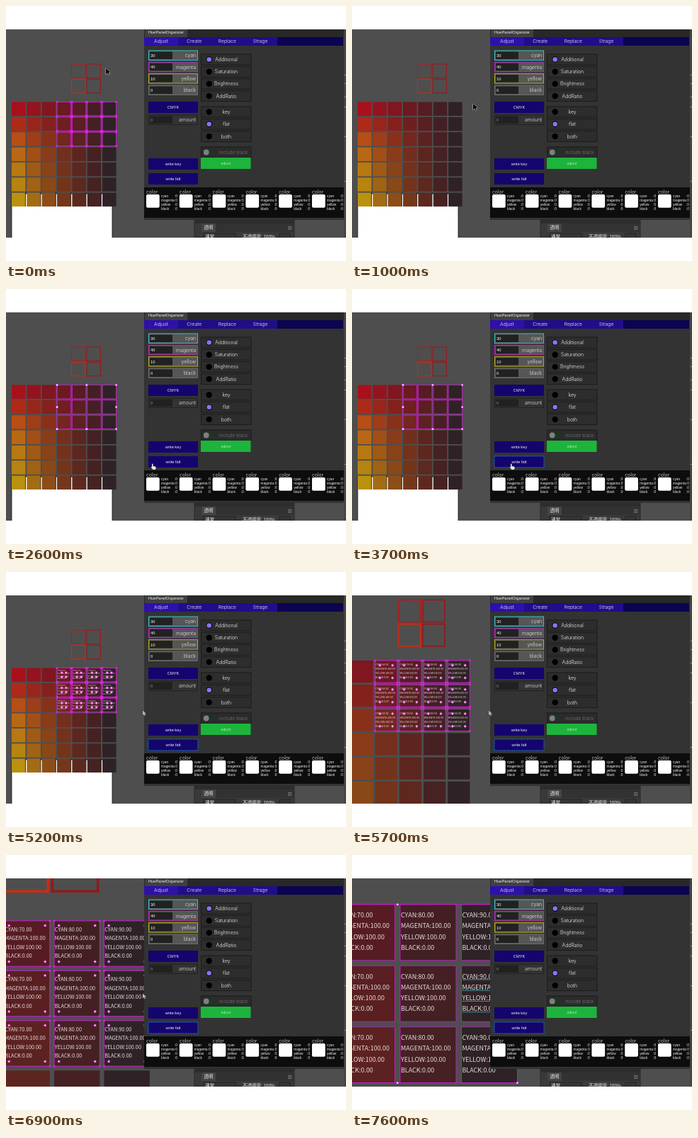
An HTML page with a canvas that plays this animation: 480 px wide and 360 px high, repeating every 8000 ms.

```html
<!DOCTYPE html>
<html lang="en">
<head>
<meta charset="utf-8">
<title>Colour panel</title>
<style>
html, body { margin: 0; width: 100%; height: 100%; overflow: hidden; background: #fff; }
canvas { display: block; width: 480px; height: 360px; }
</style>
</head>
<body>
<canvas id="stage"></canvas>
<script>
const LOOP = 8000, STEP = 100;
const SANS = '"Liberation Sans", Arial, sans-serif';
const LIGHT = 'Inter, "Liberation Sans", sans-serif';
const CJK = '"Noto Sans CJK JP", "Noto Sans CJK", sans-serif';
const MAGENTA = '#c01fc4';
const PITCH = 21.35, CELL = 19.5, ORIGIN = [8, 135.5], PIVOT = [114.75, 135.5];
const TEXT_TOP = 3.75, TEXT_PITCH = 3.77;
const canvas = document.getElementById('stage');
const ctx = canvas.getContext('2d');
const ratio = window.devicePixelRatio || 1;
canvas.width = 480 * ratio;
canvas.height = 360 * ratio;

// [time, x, y]
const cursorPath = [
  [0, 141, 88], [300, 146, 96], [900, 171, 138], [1300, 171, 138], [1900, 80, 188],
  [2050, 80, 188], [2500, 206, 246], [2700, 206, 246], [3100, 224, 246],
  [4400, 224, 246], [5000, 193, 195.5]
];
// [time, scale, x, y]
const cameraPath = [
  [5200, 1, 114.75, 135.5], [5500, 1.6, 101, 125], [5700, 1.6, 101, 125],
  [6300, 3.05, 68, 100.6], [6700, 3.05, 68, 100.6], [7500, 4.05, 68, 69.8]
];
const leftColumn = [
  [168, 16, 28], [174, 42, 24], [182, 78, 22], [184, 104, 20],
  [184, 120, 18], [182, 132, 16], [186, 146, 16]
];

function along(path, t) {
  const next = path.findIndex(k => k[0] > t);
  if (next === 0) return path[0].slice(1);
  if (next < 0) return path[path.length - 1].slice(1);
  const a = path[next - 1], b = path[next], u = (t - a[0]) / (b[0] - a[0]);
  return a.slice(1).map((v, i) => v + (b[i + 1] - v) * u);
}

function box(x, y, w, h, fill, stroke, line = 1) {
  if (fill) { ctx.fillStyle = fill; ctx.fillRect(x, y, w, h); }
  if (stroke) { ctx.strokeStyle = stroke; ctx.lineWidth = line; ctx.strokeRect(x, y, w, h); }
}

function dot(x, y, r, fill, stroke) {
  ctx.beginPath();
  ctx.arc(x, y, r, 0, 7);
  ctx.fillStyle = fill;
  ctx.fill();
  if (stroke) { ctx.strokeStyle = stroke; ctx.lineWidth = 1; ctx.stroke(); }
}

// y is the middle of the line
function label(text, x, y, size, align = 'center', color = '#eee', font = SANS) {
  ctx.font = `${font === LIGHT ? 300 : 400} ${size}px ${font}`;
  ctx.textAlign = align;
  ctx.fillStyle = color;
  ctx.fillText(text, x, y + size * 0.35);
}

function cellColor(col, row) {
  const u = col / 6, [r, g, b] = leftColumn[row];
  const mix = (from, to) => Math.round(from + (to - from) * u);
  const lift = (g - 16) * (1 - u) ** 2.1;
  return `rgb(${mix(r, 47)},${Math.round(mix(16, 34) + lift)},${mix(b, 38)})`;
}

function artwork(t) {
  const [scale, ox, oy] = along(cameraPath, t);
  const sx = x => ox + scale * (x - PIVOT[0]);
  const sy = y => oy + scale * (y - PIVOT[1]);
  const size = CELL * scale;
  const cellAt = (c, r) => [sx(ORIGIN[0] + c * PITCH), sy(ORIGIN[1] + r * PITCH)];

  box(sx(8), sy(265), 142 * scale, 200 * scale, '#fff', '#111', 0.8);

  ['#b01c1c', '#9a1a1e', '#c92c14', '#921a1c'].forEach((color, i) =>
    box(sx(92.6 + i % 2 * PITCH), sy(82 + (i >> 1) * PITCH), size, size, null, color, 1.1 * scale));

  for (let r = 0; r < 7; r++)
    for (let c = 0; c < 7; c++) {
      const [x, y] = cellAt(c, r);
      box(x, y, size, size, cellColor(c, r));
      if (r === 6 && c < 6) box(x + size - 0.3, y, 0.8, size, '#111');
    }

  if (t >= 1000 && t < 2000) return;
  const boxed = t >= 2000 && t < 4400 || t >= 7600;
  const written = t >= 4400;
  for (let r = 0; r < 3; r++)
    for (let c = 3; c < 7; c++) {
      const [x, y] = cellAt(c, r);
      if (written)
        [`CYAN:${c * 10 + 30}.00`, 'MAGENTA:100.00', 'YELLOW:100.00', 'BLACK:0.00'].forEach((line, i) =>
          label(line, x + 0.25 * scale, y + (TEXT_TOP + i * TEXT_PITCH) * scale, 2.2 * scale, 'left', '#e8dede', CJK));
      box(x, y, size, size, null, MAGENTA, boxed ? 0.9 : 1.1);
      if (boxed) continue;
      for (const [u, v] of [[0, 0], [1, 0], [0, 1], [1, 1]]) {
        box(x + u * size - 1.3, y + v * size - 1.3, 2.6, 2.6, '#e01fe0');
        if (written) dot(x + 6.7 + u * (size - 13.4), y + 6.7 + v * (size - 13.4), 1.5, '#f6dcf6', '#d83cd4');
      }
    }

  if (!boxed) return;
  const [x0, y0] = cellAt(3, 0), [x1, y1] = cellAt(6, 2);
  const w = x1 + size - x0, h = y1 + size - y0;
  box(x0, y0, w, h, null, MAGENTA, 0.9);
  for (let i = 0; i < 9; i++)
    if (i !== 4) box(x0 + i % 3 * w / 2 - 1.3, y0 + (i / 3 | 0) * h / 2 - 1.3, 2.6, 2.6, '#fff', MAGENTA, 0.5);
  if (written) {
    const [x, y] = cellAt(6, 1);
    for (let i = 0; i < 4; i++)
      box(x + 1, y + (TEXT_TOP + 1 + i * TEXT_PITCH) * scale, 50, 0.9, '#3a9fa8');
  }
}

function button(text, y, focused) {
  box(201, y, 70, 16, '#14056e');
  if (focused) {
    ctx.setLineDash([2.5, 1]);
    box(201, y, 70, 16, null, '#1c6cd0');
    ctx.setLineDash([]);
  }
  label(text, 236, y + 8, 5.7);
}

function field(text, value, y, border, dim) {
  box(201.5, y, 69, 13.5, dim ? '#333' : '#565656', border);
  box(203, y + 1.5, 32, 10.5, '#212121');
  label(value, 204, y + 7, 5.8, 'left', dim ? '#888' : '#fff');
  label(text, 268, y + 7, 6.9, 'right', '#e4e4e4', LIGHT);
}

function option(text, y, on) {
  box(275.5, y, 70.5, 15, '#2d2d2d', '#1b1b1b');
  dot(286.7, y + 7.5, 4.2, '#000');
  if (on) dot(286.7, y + 7.5, 3.3, '#8377f5');
  label(text, 311, y + 7.5, 6.9, 'center', '#eee', LIGHT);
}

function swatch(x) {
  label('color', x, 263, 6.9, 'left', '#eee', LIGHT);
  ctx.beginPath();
  ctx.roundRect(x, 266, 18.7, 18.7, 2);
  ctx.fillStyle = '#fff';
  ctx.fill();
  ['cyan', 'magenta', 'yellow', 'black'].forEach((name, i) => {
    const y = 268.8 + i * 5.8;
    label(name, x + 21, y, 4.8, 'left');
    label(':0', x + 44, y, 4.8, 'right');
  });
}

function panel(t) {
  box(195, 33, 282, 269, '#333');
  box(195, 33, 282, 11, '#282828');
  box(196, 33, 60, 11, '#404040');
  label('HuePanelOrganizer', 201, 37.5, 5.7, 'left');
  box(195, 44, 281, 12, '#0b0450');
  box(195, 44, 188, 12, '#200d8a');
  box(195, 44, 48, 12, '#2e10aa');
  ['Adjust', 'Create', 'Replace', 'Strage'].forEach((name, i) =>
    label(name, 219 + i * 46.7, 50, 6.8, 'center', '#eee', LIGHT));

  field('cyan', '30', 63, '#36bfc6');
  field('magenta', '40', 79.3, '#bd22bd');
  field('yellow', '10', 95.6, '#b5ab20');
  field('black', '0', 112, '#6c6c6c');
  button('CMYK', 135);
  field('amount', '0', 154, '#222', true);
  button('write key', 215);
  button('write falt', 236, t >= 3300);

  ['Additional', 'Saturation', 'Brightness', 'AddRatio'].forEach((name, i) => option(name, 68 + i * 17.2, i === 0));
  ['key', 'flat', 'both'].forEach((name, i) => option(name, 142 + i * 17.3, i === 1));
  box(275.5, 199, 70.5, 15, '#2b2b2b', '#1b1b1b');
  box(283, 204, 11, 5, '#17391d');
  dot(282.7, 206.5, 3.9, '#808080');
  label('include black', 341.5, 206.5, 6.6, 'right', '#777', LIGHT);
  box(275, 214, 70.5, 16, '#1db43c');
  label('adjust', 310.5, 222, 5.2, 'center', '#a8e8b0');

  box(195, 256, 282, 43, '#0d0d0d');
  for (let i = 0; i < 6; i++) swatch(198 + i * 46.8);

  box(477, 33, 3, 294, '#454545');
  for (const y of [97, 109, 128, 142, 184, 247]) box(478, y, 2, 1, '#999');
  box(266, 302, 141, 25, '#393939', '#292929');
  box(266, 302, 141, 5, '#2d2d2d');
  box(276, 307, 20, 12, '#444');
  box(296, 307, 111, 12, '#323232');
  label('透明', 286, 313, 6.5, 'center', '#eee', CJK);
  for (let i = 0; i < 3; i++) box(398, 311 + i * 2, 5.5, 0.8, '#888');
  box(279, 321, 45, 8, '#353535', '#222', 0.8);
  label('通常', 281, 325.5, 6.5, 'left', '#eee', CJK);
  label('不透明度: 100%', 334, 325.5, 6.5, 'left', '#eee', CJK);
  box(386, 321, 15, 8, '#353535', '#222', 0.8);
}

const arrow = new Path2D('M0 0 L0 8.5 L2.1 6.6 L3.6 9.6 L5 8.9 L3.6 6 L6.3 5.8 Z');
const hand = new Path2D('M0 1 Q.8 0 1.5 1 V4 L5 4.8 Q6 5.2 5.6 7 L5 9 H1.4 L-1.4 5.8 Q-1 4.6 0 5.6 Z');

function pointer(t) {
  if (t >= 7600) return;
  const [x, y] = along(cursorPath, t);
  if (t >= 1300 && t < 2000) {
    ctx.setLineDash([2, 1.5]);
    box(x, 138, 171 - x, y - 138, null, '#bbb', 0.7);
    ctx.setLineDash([]);
  }
  const overButton = t >= 2500 && t < 4500;
  const [shape, fill, edge, zoom] = overButton ? [hand, '#e6e6e6', '#222', 1]
    : t < 4500 ? [arrow, '#0a0a0a', '#ccc', 1]
    : [arrow, '#b8b8b8', '#333', 0.8];
  ctx.save();
  ctx.translate(x, y);
  ctx.scale(zoom, zoom);
  ctx.lineWidth = 1;
  ctx.strokeStyle = edge;
  ctx.fillStyle = fill;
  ctx.stroke(shape);
  ctx.fill(shape);
  ctx.restore();
}

function draw(t) {
  ctx.setTransform(ratio, 0, 0, ratio, 0, 0);
  box(0, 0, 480, 360, '#fff');
  ctx.save();
  ctx.beginPath();
  ctx.rect(0, 33, 480, 294);
  ctx.clip();
  box(0, 33, 480, 294, '#4e4e4e');
  artwork(t);
  panel(t);
  pointer(t);
  ctx.restore();
}

const start = performance.now();
function tick() {
  const t = (performance.now() - start) % LOOP;
  draw(Math.floor(t / STEP) * STEP);
  requestAnimationFrame(tick);
}
tick();
</script>
</body>
</html>
```
